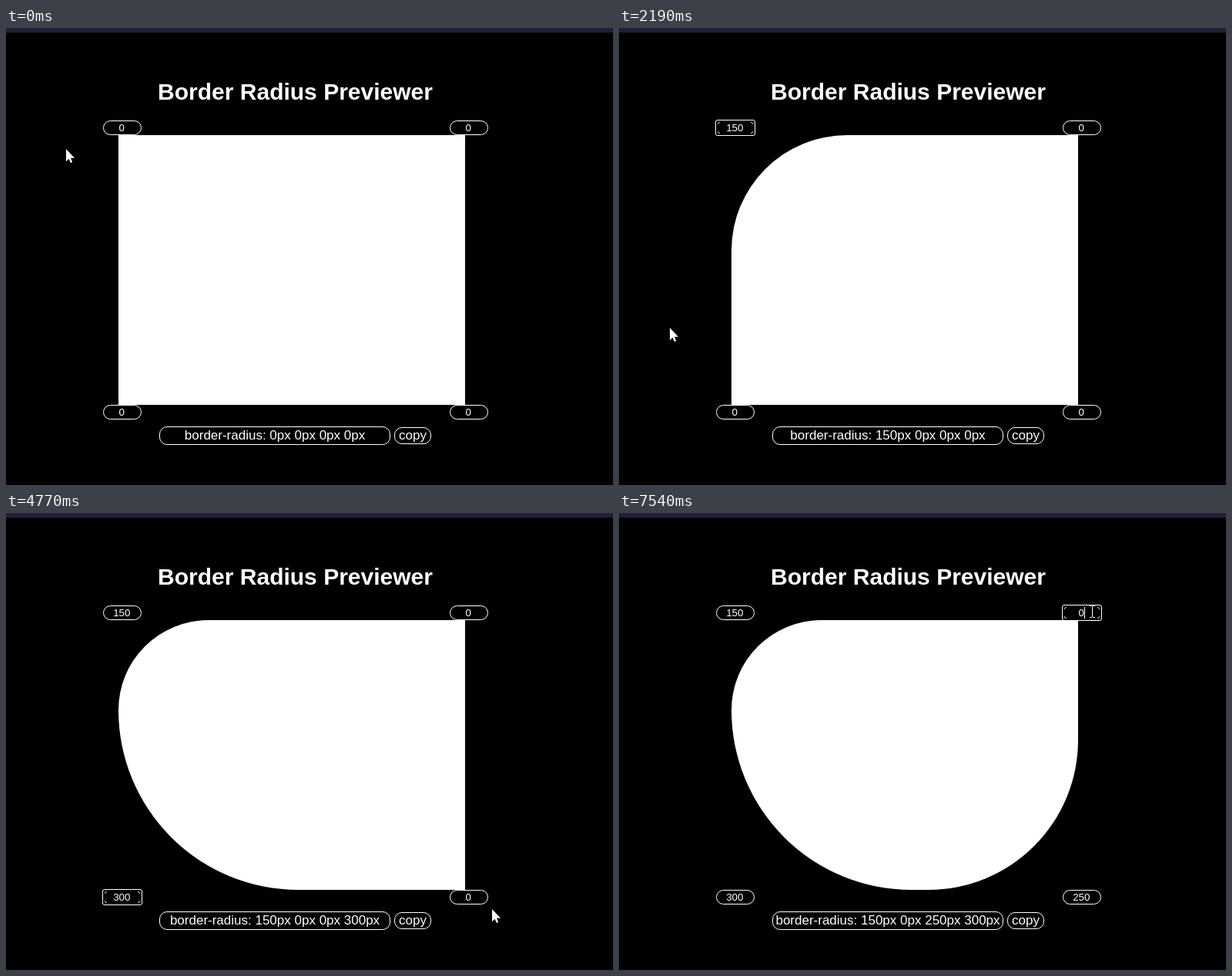
An HTML page for the animation above (8000 ms loop, 788 px wide and 593 px high).

```html
<!DOCTYPE html>
<html lang="en">
<head>
<meta charset="utf-8">
<title>Border Radius Previewer</title>
<style>
html, body { margin: 0; width: 100%; height: 100%; overflow: hidden; background: #000; }
#stage {
  position: absolute; left: 0; top: 0; width: 788px; height: 593px; overflow: hidden;
  background: #000; color: #fff; font-family: "Liberation Sans", Arial, sans-serif;
}
#stage > * { position: absolute; box-sizing: border-box; margin: 0; white-space: nowrap; text-align: center; }
#bar { left: 0; top: 0; width: 788px; height: 6px; background: #222035; }
h1 { left: 125.5px; top: 66px; width: 500px; font-size: 30px; line-height: 34px; }
#shape { left: 146px; top: 139px; width: 450px; height: 350px; background: #fff; }
.field {
  width: 50px; height: 19px; border: 1px solid #fff; border-radius: 10px;
  padding-right: 1.4px; font-size: 13.333px; line-height: 17px;
}
.field span { position: relative; display: inline-block; height: 17px; vertical-align: top; }
.field i { position: absolute; left: 100%; top: 1px; width: 1px; height: 15px; background: #fff; display: none; }
.field.focus::after {
  content: ""; position: absolute; inset: -2px; border: 1px solid #fff;
  border-radius: 3px; box-shadow: inset 0 0 0 2px #000;
}
.field.caret i { display: block; }
.pill { border: 1px solid #fff; border-radius: 10px; font-size: 17px; line-height: 22px; }
#rule { left: 199px; top: 517px; width: 300px; height: 24px; }
#copy { left: 504px; top: 518px; width: 48px; height: 22px; line-height: 20px; }
#stage > svg { overflow: visible; width: 1px; height: 1px; }
#beam { mix-blend-mode: difference; }
</style>
</head>
<body>
<div id="stage">
  <div id="bar"></div>
  <h1>Border Radius Previewer</h1>
  <div id="shape"></div>
  <div id="rule" class="pill"></div>
  <div id="copy" class="pill">copy</div>
  <svg id="arrow"><path d="M1 1V17.2L4.6 13.7L6.9 19L9.2 18L7 12.8H12Z" fill="#fff" stroke="#000" stroke-width="1.6" paint-order="stroke"/></svg>
  <svg id="beam"><path d="M0-7h1v14h-1zM-3-8h3v1h-3zM1-8h3v1h-3zM-3 7h3v1h-3zM1 7h3v1h-3z" fill="#fff" shape-rendering="crispEdges"/></svg>
</div>
<script>
const LOOP = 8000, BLINK = 510, LAG = 50;
const $ = id => document.getElementById(id);
const stage = $('stage');

// Corners in CSS order: top left, top right, bottom right, bottom left
const corners = [[126, 120], [576, 120], [576, 489], [126, 489]];

const fields = corners.map(([x, y]) => {
  const box = document.createElement('div');
  box.className = 'field';
  box.style.left = x + 'px';
  box.style.top = y + 'px';
  const span = document.createElement('span');
  const text = document.createTextNode('0');
  span.append(text, document.createElement('i'));
  box.append(span);
  stage.insertBefore(box, $('arrow'));
  return { box, text };
});

// Each visit: click a corner, erase the zero, type the value at an even pace
const visits = [
  { corner: 0, click: 670, start: 1180, gap: 117, value: '150' },
  { corner: 3, click: 3000, start: 3450, gap: 123, value: '300' },
  { corner: 2, click: 5220, start: 5720, gap: 140, value: '250' },
  { corner: 1, click: 7490, start: LOOP, gap: 120, value: '' }
];

// Pointer curves, each leaving from where the last one ended
const home = [77, 156];
const moves = [
  { from: 50, to: 620, curve: [[35, 80], [110, 80], [158, 133]] },
  { from: 1980, to: 2340, curve: [[24, 220], [24, 480], [180, 540]] },
  { from: 2340, to: 2710, curve: [[430, 560], [400, 510], [162, 503]] },
  { from: 4370, to: 4770, curve: [[280, 460], [480, 470], [630, 513]] },
  { from: 4820, to: 5020, curve: [[626, 513], [618, 508], [612, 505]] },
  { from: 6590, to: 7340, curve: [[500, 380], [545, -75], [614, 128]] }
];

function bezier(a, [b, c, d], u) {
  const v = 1 - u;
  return a.map((p, k) => v * v * v * p + 3 * v * u * (v * b[k] + u * c[k]) + u * u * u * d[k]);
}

function pointer(t) {
  let pos = home;
  for (const { from, to, curve } of moves) {
    if (t < from) break;
    pos = bezier(pos, curve, Math.min(1, (t - from) / (to - from)));
  }
  return pos.map(Math.round);
}

// Characters present at time t, or -1 before the first key
const count = (t, { start, gap, value }) =>
  t < start ? -1 : Math.min(value.length, Math.floor((t - start) / gap));

function draw(t) {
  const typed = ['0', '0', '0', '0'], applied = typed.slice(), radius = typed.slice();
  let focus = -1, since = 0;
  for (const visit of visits) {
    const { corner, click, start, gap, value } = visit;
    if (t < click) break;
    focus = corner;
    const n = count(t, visit), m = count(t - LAG, visit);
    since = n < 0 ? click : start + n * gap;
    if (n >= 0) typed[corner] = value.slice(0, n);
    if (m >= 0) applied[corner] = value.slice(0, m);
    radius[corner] = applied[corner] || '0';
  }

  const lit = Math.floor((t - since) / BLINK) % 2 === 0;
  fields.forEach(({ box, text }, c) => {
    text.data = typed[c];
    box.classList.toggle('focus', c === focus);
    box.classList.toggle('caret', c === focus && lit);
  });
  const px = list => list.map(v => v + 'px').join(' ');
  $('shape').style.borderRadius = px(radius);
  $('rule').textContent = 'border-radius: ' + px(applied);

  const [x, y] = pointer(t);
  const over = corners.some(([l, top]) => x >= l && x < l + 50 && y >= top && y < top + 19);
  for (const id of ['arrow', 'beam']) {
    const el = $(id);
    el.style.left = x + 'px';
    el.style.top = y + 'px';
    el.style.display = over === (id === 'beam') ? 'block' : 'none';
  }
}

let origin;
function tick(now) {
  origin ??= now;
  draw((now - origin) % LOOP);
  requestAnimationFrame(tick);
}
draw(0);
requestAnimationFrame(tick);
</script>
</body>
</html>
```
